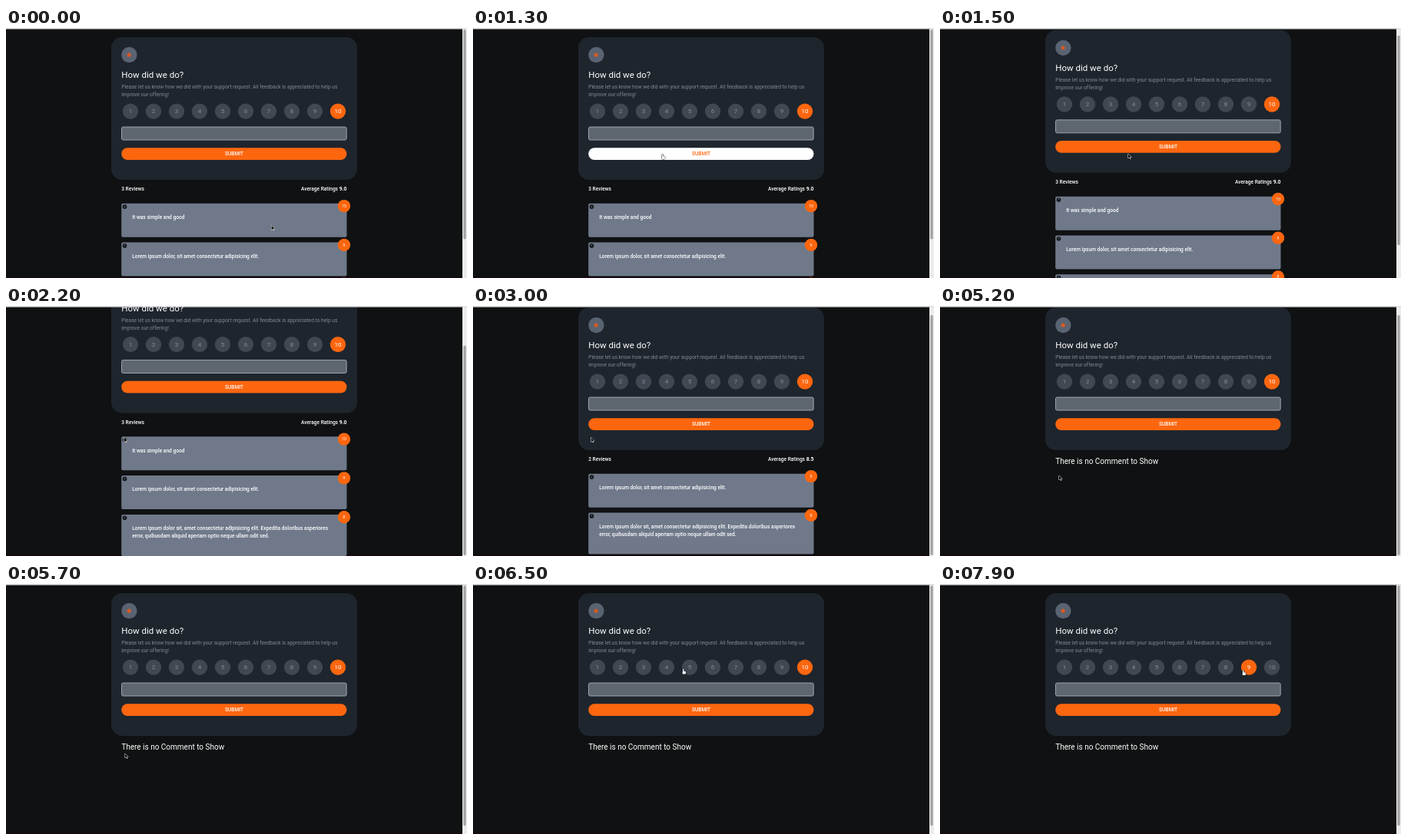
These frames come from a looping animation (600 px wide and 326 px high, 8 s). An HTML page with a canvas:

```html
<!DOCTYPE html>
<html lang="en">
<head>
<meta charset="utf-8">
<title>Feedback form</title>
<style>
  html, body { margin: 0; width: 100%; height: 100%; overflow: hidden; background: #0f1112; }
  canvas { display: block; width: 600px; height: 326px; }
</style>
</head>
<body>
<canvas id="stage"></canvas>
<script>
const W = 600, H = 326, LOOP = 8000, STEP = 100;
const LEFT = 150.2, RIGHT = 443.5, WIDTH = RIGHT - LEFT;
const ORANGE = '#fc660f', WHITE = '#fff', MUTED = '#838991';
const canvas = document.getElementById('stage');
const ctx = canvas.getContext('2d');
const ratio = window.devicePixelRatio || 1;
canvas.width = W * ratio;
canvas.height = H * ratio;

const reviews = [
  { rating: 10, gone: 2900, lines: ['It was simple and good'] },
  { rating: 9, gone: 4300, lines: ['Lorem ipsum dolor, sit amet consectetur adipisicing elit.'] },
  { rating: 8, gone: 5000, lines: [
    'Lorem ipsum dolor sit, amet consectetur adipisicing elit. Expedita doloribus asperiores',
    'error, quibusdam aliquid aperiam optio neque ullam odit sed.'] }
];

// Each stop is reached at `at`, after a move lasting `take`
const start = { x: 345.5, y: 257.5 };
const stops = [
  { at: 400, take: 100, x: 264, y: 189 },
  { at: 1000, take: 300, x: 274, y: 112 },
  { at: 1300, take: 200, x: 245, y: 164 },
  { at: 2200, take: 300, x: 153.8, y: 171.5 },
  { at: 4000, take: 700, x: 155, y: 221 },
  { at: 6500, take: 600, x: 272, y: 110.5 },
  { at: 7500, take: 700, x: 427, y: 113 },
  { at: 7800, take: 200, x: 393, y: 112 }
];

function ramp(t, from, to) {
  const p = Math.min(1, Math.max(0, (t - from) / (to - from)));
  return p * p * (3 - 2 * p);
}

function pointerAt(t) {
  return stops.reduce((pos, stop) => {
    const p = ramp(t, stop.at - stop.take, stop.at);
    return { x: pos.x + (stop.x - pos.x) * p, y: pos.y + (stop.y - pos.y) * p };
  }, start);
}

function box(x, y, w, h, r, fill, stroke) {
  ctx.beginPath();
  ctx.roundRect(x, y, w, h, r);
  ctx.fillStyle = fill;
  ctx.fill();
  if (stroke) {
    ctx.strokeStyle = stroke;
    ctx.lineWidth = 0.8;
    ctx.stroke();
  }
}

function disc(x, y, r, fill) {
  ctx.beginPath();
  ctx.arc(x, y, r, 0, Math.PI * 2);
  ctx.fillStyle = fill;
  ctx.fill();
}

function text(str, x, y, size, { color = WHITE, weight = 400, align = 'left' } = {}) {
  ctx.font = `${weight} ${size}px Roboto, "Open Sans", sans-serif`;
  ctx.textAlign = align;
  ctx.fillStyle = color;
  ctx.fillText(str, x, y);
}

function drawStar(x, y) {
  ctx.beginPath();
  for (let i = 0; i < 10; i++) {
    const a = i * Math.PI / 5 - Math.PI / 2, r = i % 2 ? 1.9 : 3.7;
    ctx.lineTo(x + r * Math.cos(a), y + r * Math.sin(a));
  }
  ctx.fillStyle = '#dc5a20';
  ctx.fill();
}

function drawForm(selected, hover) {
  box(137, 12, 320, 186, 14, '#1e252d');
  disc(160.4, 35, 10.2, '#596372');
  drawStar(160.2, 35.1);
  text('How did we do?', LEFT, 65, 11.5);
  text('Please let us know how we did with your support request. All feedback is appreciated to help us',
    LEFT, 79, 6.67, { color: MUTED });
  text('improve our offering!', LEFT, 89, 6.67, { color: MUTED });

  for (let n = 1; n <= 10; n++) {
    const on = n === selected, x = 132 + n * 30;
    disc(x, 108.6, 10.2, on ? ORANGE : '#414852');
    text(n, x, 111.2, 8, { color: on ? WHITE : '#868d98', align: 'center' });
  }

  box(150.5, 129, WIDTH - 0.6, 17, 2, '#5e6770', '#b4b9be');
  box(LEFT, 156.2, WIDTH, 15.8, 7.9, hover ? WHITE : ORANGE);
  text('SUBMIT', 297, 166.2, 6.6, { color: hover ? ORANGE : WHITE, weight: 500, align: 'center' });
}

function drawReview({ rating, lines }, y, h) {
  box(LEFT, y, WIDTH, h, 2, '#6f798a');
  disc(154.5, y + 4.3, 2.8, '#14171a');
  text('×', 154.5, y + 5.8, 4.5, { color: '#7c8592', align: 'center' });
  disc(440, y + 3.3, 8.2, ORANGE);
  text(rating, 440, y + 5.1, 5.1, { align: 'center' });
  lines.forEach((line, i) => text(line, 164.2, y + 20.2 + i * 10, 6.6, { weight: 500 }));
}

function drawList(shown) {
  if (!shown.length) {
    text('There is no Comment to Show', LEFT, 215.7, 10);
    return;
  }
  const mean = (shown.reduce((sum, r) => sum + r.rating, 0) / shown.length).toFixed(1);
  text(`${shown.length} Reviews`, LEFT, 212.4, 6.6, { weight: 500 });
  text(mean, RIGHT, 212.4, 6.8, { weight: 700, align: 'right' });
  const gap = ctx.measureText(mean).width + 1.7;
  text('Average Ratings', RIGHT - gap, 212.4, 6.6, { weight: 500, align: 'right' });
  let y = 228.8;
  for (const review of shown) {
    const h = 34 + review.lines.length * 10;
    drawReview(review, y, h);
    y += h + 6.8;
  }
}

function drawScrollbar(scroll, view, pageHeight) {
  const scale = view / pageHeight;
  ctx.fillStyle = '#ececec';
  ctx.fillRect(594, 0, 6, H);
  box(595.3, 2 + scroll * scale, 3.4, view * scale, 1.7, '#a4a4a4');
  ctx.fillStyle = '#dedede';
  ctx.fillRect(0, 0, W, 1.5);
}

function drawPointer({ x, y }, hand) {
  const shape = new Path2D();
  if (hand) {
    shape.roundRect(1, 0.3, 1.3, 4.5, 0.6);
    shape.roundRect(0.6, 3.2, 4.3, 3.8, 1.2);
  } else {
    shape.moveTo(0, 0);
    shape.lineTo(0, 5.8);
    shape.lineTo(1.6, 4.5);
    shape.lineTo(2.7, 6.6);
    shape.lineTo(2.2, 4.3);
    shape.lineTo(4.1, 4.2);
    shape.closePath();
  }
  ctx.save();
  ctx.translate(x, y);
  ctx.lineJoin = 'round';
  ctx.lineWidth = 1;
  ctx.strokeStyle = hand ? '#15181b' : '#f2f2f2';
  ctx.stroke(shape);
  ctx.fillStyle = hand ? WHITE : '#0a0a0a';
  ctx.fill(shape);
  ctx.restore();
}

function render(t) {
  const shown = reviews.filter(r => t < r.gone);
  const view = H - 3;
  const pageHeight = shown.length === reviews.length ? 381.5 : 333;
  const limit = pageHeight - view;
  const scroll = Math.min(58.5 * ramp(t, 1400, 1800), limit) * (1 - ramp(t, 5400, 5700));
  const pointer = pointerAt(t);
  const pageY = pointer.y + scroll;
  const onSubmit = pageY > 156 && pageY < 172;
  const onNumber = pageY > 98 && pageY < 119;

  ctx.setTransform(ratio, 0, 0, ratio, 0, 0);
  ctx.fillStyle = '#0f1112';
  ctx.fillRect(0, 0, W, H);
  ctx.fillStyle = '#170811';
  ctx.fillRect(0, 324.3, W, 1.7);
  ctx.save();
  ctx.translate(0, -scroll);
  drawForm(t < 7800 ? 10 : 9, onSubmit);
  drawList(shown);
  ctx.restore();
  drawScrollbar(scroll, view, pageHeight);
  drawPointer(pointer, onSubmit || onNumber);
}

function tick(now) {
  render(Math.floor((now % LOOP) / STEP) * STEP);
  requestAnimationFrame(tick);
}
requestAnimationFrame(tick);
</script>
</body>
</html>
```
